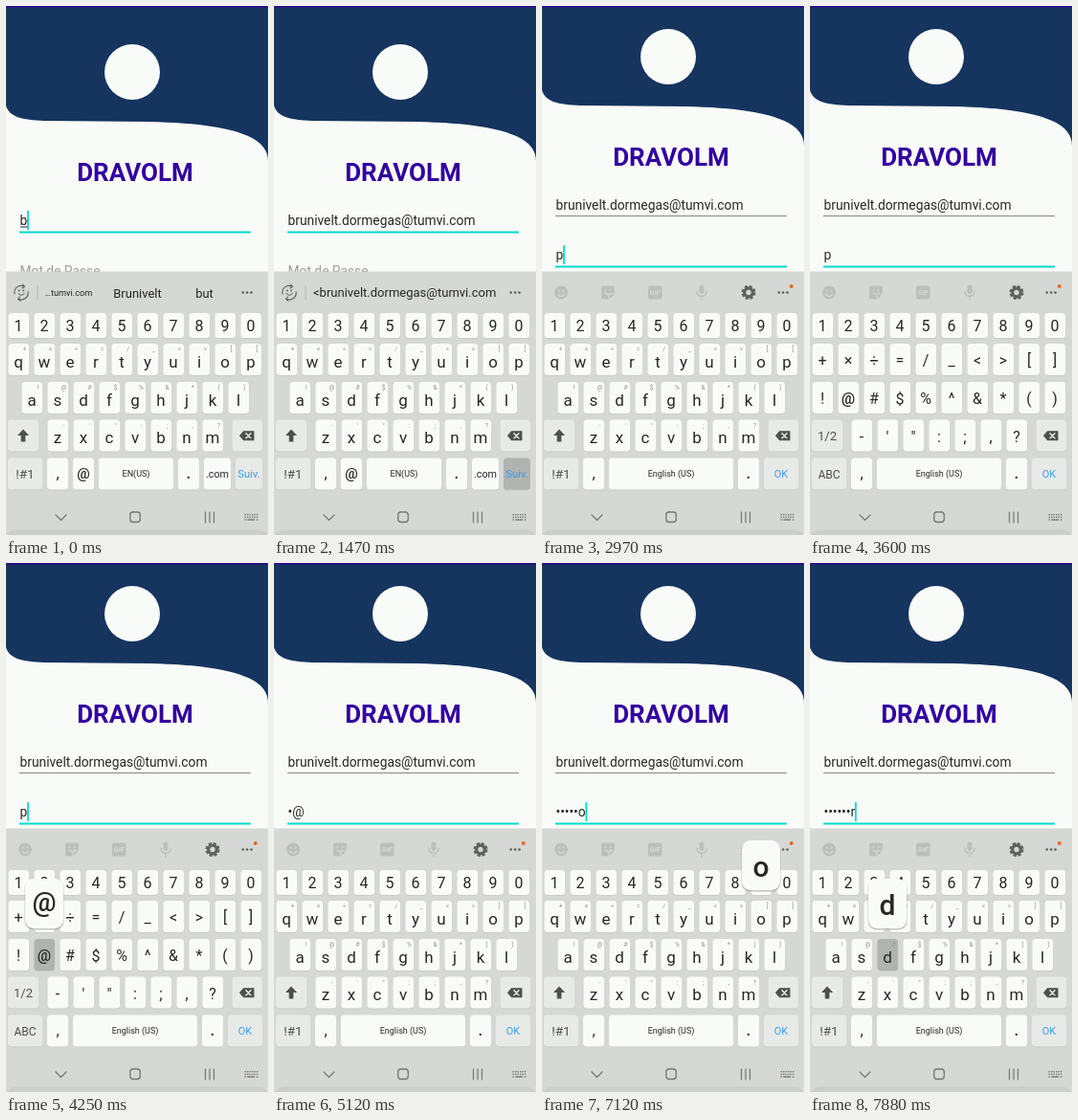
Write an HTML page that moves like this. It is 274 px wide and 553 px high and loops after 8 s.

```html
<!DOCTYPE html>
<html lang="fr">
<head>
<meta charset="utf-8">
<title>Login form</title>
<style>
  html, body { margin: 0; width: 100%; height: 100%; overflow: hidden; background: #f9fbf8; }
  svg { display: block; width: 100%; height: 100%; }
  text { font-family: Roboto, Arial, sans-serif; white-space: pre; }
</style>
</head>
<body>
<svg id="stage" viewBox="0 0 274 553"></svg>
<script>
const stage = document.getElementById('stage');
const LOOP = 8000;
const MAIL = 'brunivelt.dormegas@tumvi.com';
const INK = '#262826', SOFT = '#4c504d', GREY = '#bcc0bc', DARK = '#5e625f', PANEL = '#d5d8d5';
const KEY = '#f9fbf8', SIDE = '#e7eae6', HELD = '#b0b4b0', BLUE = '#3a9cf0', TEAL = '#06dacf';

// Each step changes part of the state from its time on.
const steps = [
  [0, { scroll: 0, field: 'mail', mail: 'b', pass: '', caret: true, keys: 'mail', bar: 'words', held: '', pop: '' }],
  [150, { caret: false }],
  [570, { caret: true }],
  [810, { mail: MAIL, bar: 'full' }],
  [1320, { caret: false }],
  [1470, { held: 'Suiv.' }],
  [1590, { held: '', field: 'pass', caret: true, scroll: 7 }],
  [1710, { scroll: 14, keys: 'text', bar: 'tools' }],
  [1830, { scroll: 16 }],
  [2090, { caret: false }],
  [2580, { caret: true }],
  [2850, { held: 'p', pop: 'p' }],
  [2970, { held: '', pop: '', pass: 'p' }],
  [3460, { held: '!#1', caret: false }],
  [3600, { held: '', keys: 'sym' }],
  [4000, { caret: true }],
  [4250, { held: '@', pop: '@' }],
  [4370, { held: '', pass: '•@' }],
  [4490, { pop: '' }],
  [4880, { held: 'ABC', caret: false }],
  [5000, { held: '', keys: 'text' }],
  [5360, { caret: true }],
  [5850, { held: 's', pop: 's', pass: '••', caret: false }],
  [6000, { held: '', pass: '••s', caret: true }],
  [6120, { pop: '' }],
  [6380, { pop: 's', pass: '•••s' }],
  [6500, { pop: '' }],
  [6760, { held: 'w', pop: 'w' }],
  [6880, { held: '', pop: '', pass: '••••w' }],
  [7120, { pop: 'o', pass: '•••••o' }],
  [7240, { pop: '' }],
  [7480, { pop: 'r', pass: '••••••r' }],
  [7610, { pop: '' }],
  [7880, { held: 'd', pop: 'd' }]
];

const esc = s => s.replace(/&/g, '&amp;').replace(/</g, '&lt;');
const text = (s, x, y, size, fill = INK, extra = '') =>
  `<text x="${x}" y="${y}" font-size="${size}" fill="${fill}" ${extra}>${esc(s)}</text>`;
const mid = (s, x, y, size, fill, extra = '') => text(s, x, y, size, fill, 'text-anchor="middle" ' + extra);
const rect = (x, y, w, h, fill, r = 0, extra = '') =>
  `<rect x="${x}" y="${y}" width="${w}" height="${h}" rx="${r}" fill="${fill}" ${extra}/>`;
const dot = (x, y, r, fill) => `<circle cx="${x}" cy="${y}" r="${r}" fill="${fill}"/>`;
const line = (d, color, w = 1.2) =>
  `<path d="${d}" fill="none" stroke="${color}" stroke-width="${w}" stroke-linecap="round" stroke-linejoin="round"/>`;
const weight = c => c === '@' ? 'font-weight="500"' : '';

function page(s) {
  const onMail = s.field === 'mail';
  const underline = (y, active) => active ? rect(14, y + .5, 242, 2, TEAL) : rect(14, y, 242, 1, '#858886');
  return `<g transform="translate(0 ${-s.scroll})">
    <path d="M0 0H274V162C274 136 236 123 150 121L40 120C17 119 3 116 0 104Z" fill="#15345e"/>
    ${dot(132, 69, 29, '#f9fbf8')}
    ${mid('DRAVOLM', 135, 182.5, 26, '#3200a0', 'font-weight="700"')}
    ${text(s.mail, 14.5, 229, 13.8, INK, 'id="mail"')}
    ${s.mail === 'b' ? rect(15, 230.5, 7, 1, INK) : ''}
    ${underline(235, onMail)}
    ${s.pass ? '' : text('Mot de Passe', 14.5, 282, 13.8, '#9b9e9b')}
    ${text(s.pass, 14.5, 281, 13.8, INK, 'id="pass"')}
    ${underline(287, !onMail)}
    ${s.caret ? rect(0, onMail ? 214 : 266, 1.8, 20, TEAL, 0, 'id="caret"') : ''}
  </g>` + rect(0, 0, 274, 1.5, '#2b0a8c');
}

function toolbar(bar) {
  const dots = [247.8, 252.2, 256.6].map(x => dot(x, 299.5, 1.3, DARK)).join('');
  if (bar !== 'tools') {
    const icon = line('M9 301A7 7 0 0 1 19 293.2M23 298.5A7 7 0 0 1 13 306.2M17.5 291L19.5 293.3L17 295M14.5 304.2L12.5 306.2L15 308.2', DARK, 1.1)
      + line('M13 300.5Q16 304 19 300.5', DARK, 1.1) + dot(13.8, 297.5, .9, DARK) + dot(18.2, 297.5, .9, DARK);
    const words = bar === 'full' ? text('<' + MAIL, 41, 304, 13)
      : mid('…tumvi.com', 65.5, 303, 9.2) + mid('Brunivelt', 137.5, 304.5, 13) + mid('but', 207.5, 304.5, 13);
    return icon + rect(32.5, 292, 1, 15, '#b4b8b4') + words + dots;
  }
  const smile = dot(20, 299.5, 7, GREY) + dot(17.6, 297.7, 1, PANEL) + dot(22.4, 297.7, 1, PANEL)
    + line('M16.5 301.5Q20 305.5 23.5 301.5', PANEL);
  const sticker = `<path d="M64 292.5H74Q76 292.5 76 294.5V301L70 306.5H64Q62 306.5 62 304.5V294.5Q62 292.5 64 292.5Z" fill="${GREY}"/>`
    + line('M66 300Q69 303 72 300M70 306V301H76', PANEL) + dot(66.5, 297, .9, PANEL) + dot(71.5, 297, .9, PANEL);
  const gif = rect(111, 292.5, 14.5, 14, GREY, 2) + mid('GIF', 118.2, 302.2, 7, PANEL, 'font-weight="700"');
  const mic = rect(164.5, 291.5, 5, 9.5, GREY, 2.5) + line('M162 298Q162 303.5 167 303.5Q172 303.5 172 298M167 304V307', GREY, 1.3);
  const ring = (r, w, dash) =>
    `<circle cx="216" cy="299.5" r="${r}" fill="none" stroke="${DARK}" stroke-width="${w}" stroke-dasharray="${dash}"/>`;
  const gear = ring(6.3, 2.4, '3.1 1.85') + ring(4.3, 3.2, 'none');
  return smile + sticker + gif + mic + gear + dots + dot(260.8, 293, 2, '#f0661e');
}

const rowTop = { num: 321, a: 353, b: 393, c: 432.5, d: 472.5 };
const spread = (chars, x0) => [...chars].map((c, i) => [c, x0 + i * 27]);

function layout(sym) {
  const size = sym ? 16 : 17;
  return [
    { top: rowTop.num, h: 26, size: 16, list: spread('1234567890', 13) },
    { top: rowTop.a, h: 33, size, list: spread(sym ? '+×÷=/_<>[]' : 'qwertyuiop', 13), hints: '+×÷=/_<>[]' },
    { top: rowTop.b, h: 33, size, list: sym ? spread('!@#$%^&*()', 13) : spread('asdfghjkl', 27), hints: '!@#$%&*()' },
    { top: rowTop.c, h: 33, size, list: spread(sym ? '-\'":;,?' : 'zxcvbnm', 54), hints: '-\'":;,?' }
  ];
}

const keyBox = (x, y, w, h, fill) => rect(x, y + .8, w, h, '#c4c8c4', 3.5) + rect(x, y, w, h, fill, 3.5);

function popup(c, x, top) {
  const px = Math.min(x - 20, 228), py = top - 63, at = c === '@';
  return rect(px - .5, py + 1, 41, 52.5, '#8e928e', 9, 'opacity=".5"') + rect(px, py, 40, 52, KEY, 9)
    + mid(c, px + 20, py + (at ? 34 : 37.5), at ? 28 : 30, INK, 'font-weight="500"');
}

function keyboard(s) {
  const sym = s.keys === 'sym';
  let out = rect(0, 277.5, 274, 276, PANEL) + toolbar(s.bar), pop = '';
  for (const r of layout(sym)) {
    r.list.forEach(([c, x], i) => {
      out += keyBox(x - 10.5, r.top, 21.5, r.h, s.held === c ? HELD : KEY);
      out += mid(c, x, r.top + (r.h < 30 ? 19 : sym ? 23 : 24.5), r.size, INK, weight(c));
      if (r.hints && !sym) out += mid(r.hints[i], x + 6.5, r.top + 8, 6.5, '#8f938f');
      if (s.pop === c) pop = popup(c, x, r.top);
    });
  }

  const wide = (c, x, w, size, fill = KEY, ink = INK, dy = 21) =>
    keyBox(x, rowTop.d, w, 33, s.held === c ? HELD : fill) + mid(c, x + w / 2, rowTop.d + dy, size, ink, weight(c));

  out += keyBox(2, rowTop.c, 32, 33, SIDE) + keyBox(236.5, rowTop.c, 31.5, 33, SIDE);
  out += sym ? mid('1/2', 18, 453.5, 13, SOFT)
    : `<path d="M18 442.5L24 449H20.3V455.5H15.7V449H12Z" fill="${SOFT}"/>`;
  out += `<path d="M244 449.3L248.3 444.3H259.5V454.3H248.3Z" fill="${SOFT}"/>` + line('M251 446.7L256 451.9M256 446.7L251 451.9', KEY, 1.3);

  out += wide(sym ? 'ABC' : '!#1', 2, 36, sym ? 12 : 13.5, SIDE, SOFT) + wide(',', 43, 22, 16);
  if (s.keys === 'mail') {
    out += wide('@', 70, 22, 15) + wide('EN(US)', 97, 78, 9, KEY, INK, 19.5) + wide('.', 180, 22, 20)
      + wide('.com', 207, 28, 10.8, KEY, INK, 20) + wide('Suiv.', 240, 28, 11.3, SIDE, BLUE, 20.5);
  } else {
    out += wide('English (US)', 70, 130, 9, KEY, INK, 19.5) + wide('.', 205, 22, 20) + wide('OK', 232, 36, 11, SIDE, BLUE, 20.5);
  }
  return out + navigation() + pop;
}

function navigation() {
  const c = '#747874';
  let out = rect(0, 547.5, 274, 20, '#cbcecb', 10) + line('M52 532L57.5 537.5L63 532', c)
    + rect(129.8, 529, 10.5, 10.5, 'none', 3, `stroke="${c}" stroke-width="1.3"`)
    + line('M208.5 529V540M213 529V540M217.5 529V540', c);
  for (let i = 0; i < 6; i++) out += rect(249.5 + i * 2.5, 531, 1.4, 1.4, c) + rect(249.5 + i * 2.5, 533.7, 1.4, 1.4, c);
  return out + rect(249.5, 536.4, 1.4, 1.4, c) + rect(252.3, 536.4, 8, 1.4, c) + rect(262, 536.4, 1.4, 1.4, c);
}

function draw(s) {
  stage.innerHTML = page(s) + keyboard(s);
  const caret = document.getElementById('caret');
  if (caret) {
    const width = s[s.field] ? document.getElementById(s.field).getComputedTextLength() : 0;
    caret.setAttribute('x', 14.3 + width);
  }
}

let shown = -1;
function update(ms) {
  const t = ms % LOOP;
  const count = steps.filter(([at]) => at <= t).length;
  if (count !== shown) {
    shown = count;
    draw(Object.assign({}, ...steps.slice(0, count).map(([, change]) => change)));
  }
}

const start = performance.now();
function tick() {
  update(performance.now() - start);
  requestAnimationFrame(tick);
}
tick();
</script>
</body>
</html>
```
